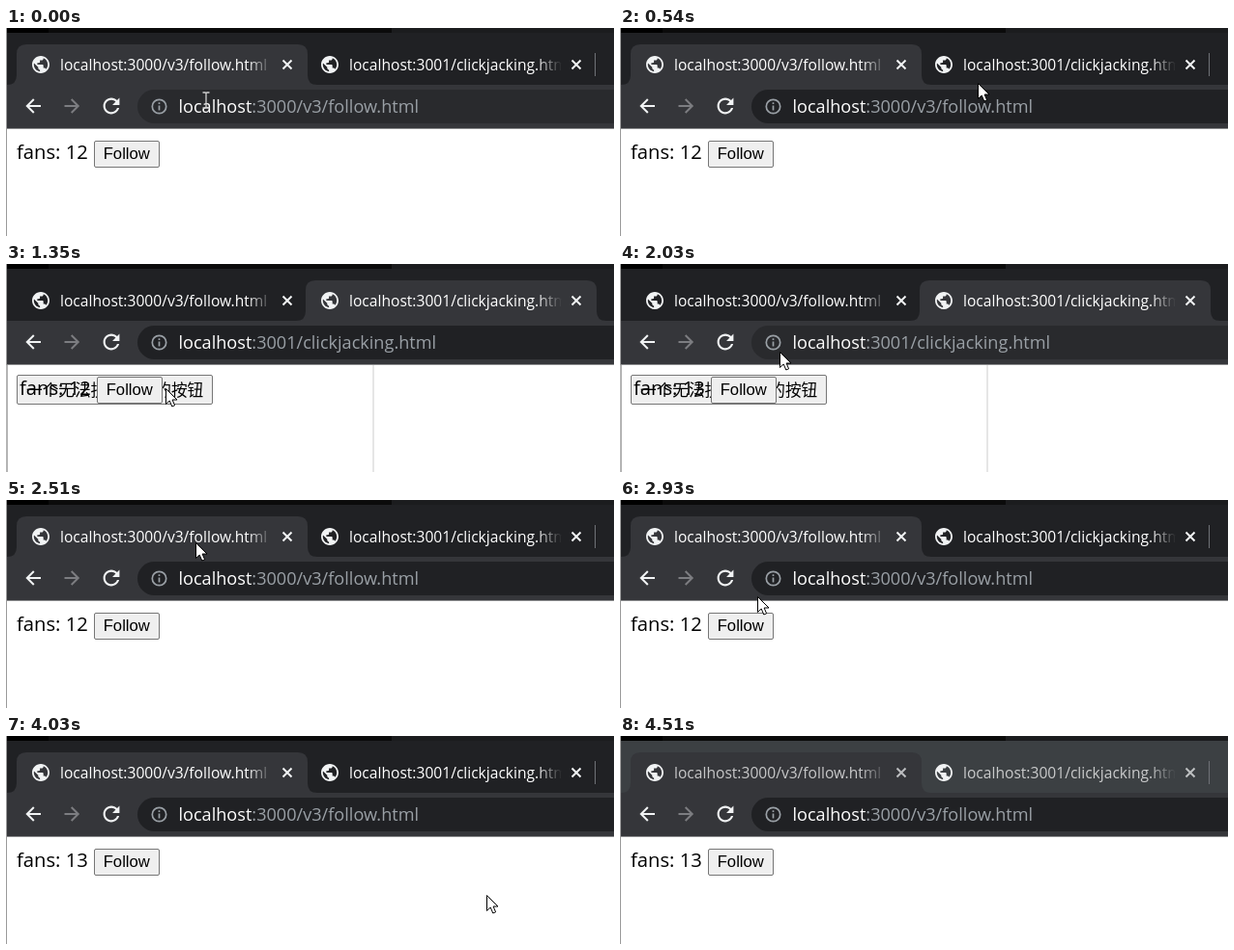
Animation of 629x216 px, one loop 4570 ms. Source, as an HTML page:

```html
<!DOCTYPE html>
<html lang="en">
<head>
<meta charset="utf-8">
<title>Clickjacking demo</title>
<style>
html, body { margin: 0; width: 100%; height: 100%; overflow: hidden; background: #fff; }
svg { display: block; width: 629px; height: 216px; }
text { white-space: pre; }
.ui { font-family: "Open Sans", "Noto Sans", sans-serif; }
.title { font-size: 15.6px; fill: #fff; }
.url { font-size: 18.1px; fill: #9aa0a6; }
.fans { font-size: 20.2px; fill: #000; }
.btn { font: 16.67px "Liberation Sans", Arial, sans-serif; fill: #000; }
.zh { font: 16.67px "Noto Sans CJK SC", "Noto Sans CJK", sans-serif; fill: #000; }
.line { fill: none; stroke: #f1f3f4; stroke-width: 2; }
</style>
</head>
<body>
<svg viewBox="0 0 629 216">
  <defs>
    <path id="globe" transform="translate(-10.8 -10.8) scale(.9)" d="M12 2C6.48 2 2 6.48 2 12s4.48 10 10 10 10-4.48 10-10S17.52 2 12 2zm-1 17.93c-3.95-.49-7-3.85-7-7.93 0-.62.08-1.21.21-1.79L9 15v1c0 1.1.9 2 2 2v1.93zm6.9-2.54c-.26-.81-1-1.39-1.9-1.39h-1v-3c0-.55-.45-1-1-1H8v-2h2c.55 0 1-.45 1-1V7h2c1.1 0 2-.9 2-2v-.41c2.93 1.19 5 4.06 5 7.41 0 2.08-.8 3.97-2.1 5.39z"/>
    <path id="back" d="M7.5 0H-6.5M.3 -7L-6.7 0L.3 7"/>
    <linearGradient id="fade" gradientUnits="userSpaceOnUse" x1="238" x2="265">
      <stop stop-color="#fff"/><stop offset="1" stop-color="#000"/>
    </linearGradient>
    <mask id="clip" maskUnits="userSpaceOnUse" x="0" y="0" width="265" height="60">
      <rect width="265" height="60" fill="url(#fade)"/>
    </mask>
  </defs>

  <rect width="629" height="216" fill="#fff"/>
  <rect id="strip" width="629" height="60"/>
  <path d="M0 0H399V5H0z" fill="#0b0b0b"/>
  <path d="M0 0H44V5H0z" fill="#000"/>
  <path d="M399 0H629V5H399z" fill="#1b1c1e"/>
  <g id="tabs"></g>
  <path id="divider" d="M609.5 26V50" stroke="#6f7277"/>

  <rect y="59" width="629" height="45" fill="#35363a"/>
  <rect y="104" width="629" height="1" fill="#8a8b8d"/>
  <rect id="pill" x="136" y="64" width="520" height="35" rx="17.5"/>
  <use href="#back" class="line" x="28.5" y="81"/>
  <use href="#back" class="line" transform="translate(68 81) scale(-1 1)" opacity=".38"/>
  <circle id="halo" cx="109" cy="81" r="18" fill="#515256"/>
  <path transform="translate(96.4 68.4) scale(1.05)" fill="#f1f3f4" d="M17.65 6.35C16.2 4.9 14.21 4 12 4c-4.42 0-7.99 3.58-7.99 8s3.57 8 7.99 8c3.73 0 6.84-2.55 7.73-6h-2.08c-.82 2.33-3.04 4-5.65 4-3.31 0-6-2.69-6-6s2.69-6 6-6c1.66 0 3.14.69 4.22 1.78L13 11h7V4l-2.35 2.35z"/>
  <g fill="none" stroke="#9aa0a6" stroke-width="1.7">
    <circle cx="158.5" cy="81.5" r="7.2"/>
    <path d="M158.5 80.5V85.5M158.5 77.2V78.9"/>
  </g>
  <text class="ui url" x="178.5" y="88"><tspan fill="#fff">localhost</tspan><tspan id="path"></tspan></text>

  <path d="M.5 0V216" stroke="#9a9a9a"/>
  <g id="plain">
    <text class="ui fans" x="11" y="136"></text>
    <g class="follow" transform="translate(91 117)"></g>
  </g>
  <g id="trap">
    <path d="M1 105V216" stroke="#b4b4b4" stroke-width="2"/>
    <path d="M380 105V216" stroke="#e6e6e6" stroke-width="2"/>
    <rect x="11.5" y="115.5" width="202" height="30" rx="1.5" fill="#efefef" stroke="#767676"/>
    <text class="zh" x="21" y="137">一个无法抗拒诱惑的按钮</text>
    <text class="ui fans" x="14" y="136"></text>
    <g class="follow" transform="translate(94 117)"></g>
  </g>

  <path id="arrow" d="M.5 .5V16.5L4.2 13L6.8 19L9.6 17.8L7.1 12H12z" fill="#fff" stroke="#000" stroke-width="1"/>
  <path id="beam" d="M-3.5 -8H-1Q0 -8 0 -7Q0 -8 1 -8H3.5M0 -7V7M-3.5 8H-1Q0 8 0 7Q0 8 1 8H3.5" fill="none" stroke="#d0d0d0" stroke-width="1.3"/>
</svg>

<script>
const LOOP = 4570;
const TO_TRAP = 780, LIKE = 1760, TO_PLAIN = 2440, RELOAD = 3530, GONE = 4180, BLUR = 4510;
const $ = id => document.getElementById(id);

// pointer path: time, x, y
const path = [
  [0, 207, 75], [30, 207, 75], [540, 370, 57], [760, 404, 45], [960, 404, 45],
  [1080, 342, 63], [1350, 165, 129], [1550, 134, 132], [1800, 134, 132],
  [2030, 165, 91], [2190, 199, 49], [2290, 199, 49], [2400, 196, 44],
  [2600, 196, 44], [2840, 181, 73], [2930, 142, 100], [3260, 111, 86],
  [3520, 111, 86], [3610, 135, 79], [3910, 372, 112], [4180, 598, 222]
];

const pages = ["3000/v3/follow.html", "3001/clickjacking.html"];

function tabMarkup(x, url) {
  return `<g transform="translate(${x} 0)">
    <path class="shape" d="M-10 59Q0 59 0 49V27Q0 17 10 17H291Q301 17 301 27V49Q301 59 311 59z" fill="#35363a"/>
    <use href="#globe" x="25" y="38" fill="#f1f3f4"/>
    <g class="label">
      <g mask="url(#clip)"><text class="ui title" x="45" y="44">localhost:${url}</text></g>
      <path class="line" d="M275.5 33.5L284.5 42.5M284.5 33.5L275.5 42.5"/>
    </g></g>`;
}

$("tabs").innerHTML = tabMarkup(11, pages[0]) + tabMarkup(310, pages[1]);
const shapes = document.querySelectorAll(".shape");
const labels = document.querySelectorAll(".label");
const fans = document.querySelectorAll(".fans");
const buttons = document.querySelectorAll(".follow");
for (const b of buttons) {
  b.innerHTML = `<rect x=".5" y=".5" width="67" height="27" rx="1.5"/><text class="btn" x="9.7" y="19.3">Follow</text>`;
}

const ramp = (t, a, b) => Math.max(0, Math.min(1, (t - a) / (b - a)));
const slope = (i, k) => (path[i + 1][k] - path[i][k]) / (path[i + 1][0] - path[i][0]);

// tangent that never overshoots a waypoint
function tangent(i, k) {
  if (i === 0 || i === path.length - 1) return 0;
  const a = slope(i - 1, k), b = slope(i, k);
  return a * b > 0 ? 2 * a * b / (a + b) : 0;
}

function pointer(t) {
  let i = 0;
  while (i < path.length - 2 && t >= path[i + 1][0]) i++;
  const span = path[i + 1][0] - path[i][0];
  const u = ramp(t, path[i][0], path[i + 1][0]);
  const at = k => {
    const p = path[i][k], q = path[i + 1][k];
    const m = tangent(i, k) * span, n = tangent(i + 1, k) * span;
    const s = u * u * (3 - 2 * u);
    return Math.round(p + (q - p) * s + m * u * (1 - u) ** 2 - n * u * u * (1 - u));
  };
  return [at(1), at(2)];
}

const show = (el, on) => el.setAttribute("visibility", on ? "visible" : "hidden");

function draw(t) {
  const trap = t >= TO_TRAP && t < TO_PLAIN;
  const blurred = t >= BLUR;
  const [x, y] = pointer(t);

  $("strip").setAttribute("fill", blurred ? "#3c4043" : "#202124");
  shapes[0].setAttribute("opacity", trap ? 0.5 * ramp(t, 2280, 2400) : 1);
  shapes[1].setAttribute("opacity", trap ? 1 : t < TO_TRAP ? 0.5 * ramp(t, 560, 700) : 0);
  labels.forEach(l => l.setAttribute("opacity", blurred ? 0.72 : 1));
  show($("divider"), !trap && !(t >= 570 && t < TO_TRAP));

  const inPill = x > 136 && y > 64 && y < 99;
  $("pill").setAttribute("fill", inPill ? "#292a2d" : "#202124");
  $("path").textContent = ":" + pages[trap ? 1 : 0];
  $("halo").setAttribute("opacity", ramp(t, 3400, 3460) * (1 - ramp(t, 3600, 3720)));
  show($("plain"), !trap);
  show($("trap"), trap);
  fans[0].textContent = "fans: " + (t < RELOAD ? 12 : 13);
  fans[1].textContent = "fans: " + (t < LIKE ? 12 : 13);

  const over = trap && x >= 94 && x < 162 && y >= 117 && y < 145;
  buttons.forEach((b, i) => {
    const box = b.firstChild, hot = over && i === 1;
    box.setAttribute("fill", hot ? "#e5e5e5" : "#efefef");
    box.setAttribute("stroke", hot ? "#4f4f4f" : "#767676");
  });

  const typing = inPill && x > 182;
  show($("arrow"), t < GONE && !typing);
  show($("beam"), t < GONE && typing);
  for (const id of ["arrow", "beam"]) $(id).setAttribute("transform", `translate(${x} ${y})`);
}

const start = performance.now();
function tick() {
  draw((performance.now() - start) % LOOP);
  requestAnimationFrame(tick);
}
draw(0);
requestAnimationFrame(tick);
</script>
</body>
</html>
```
